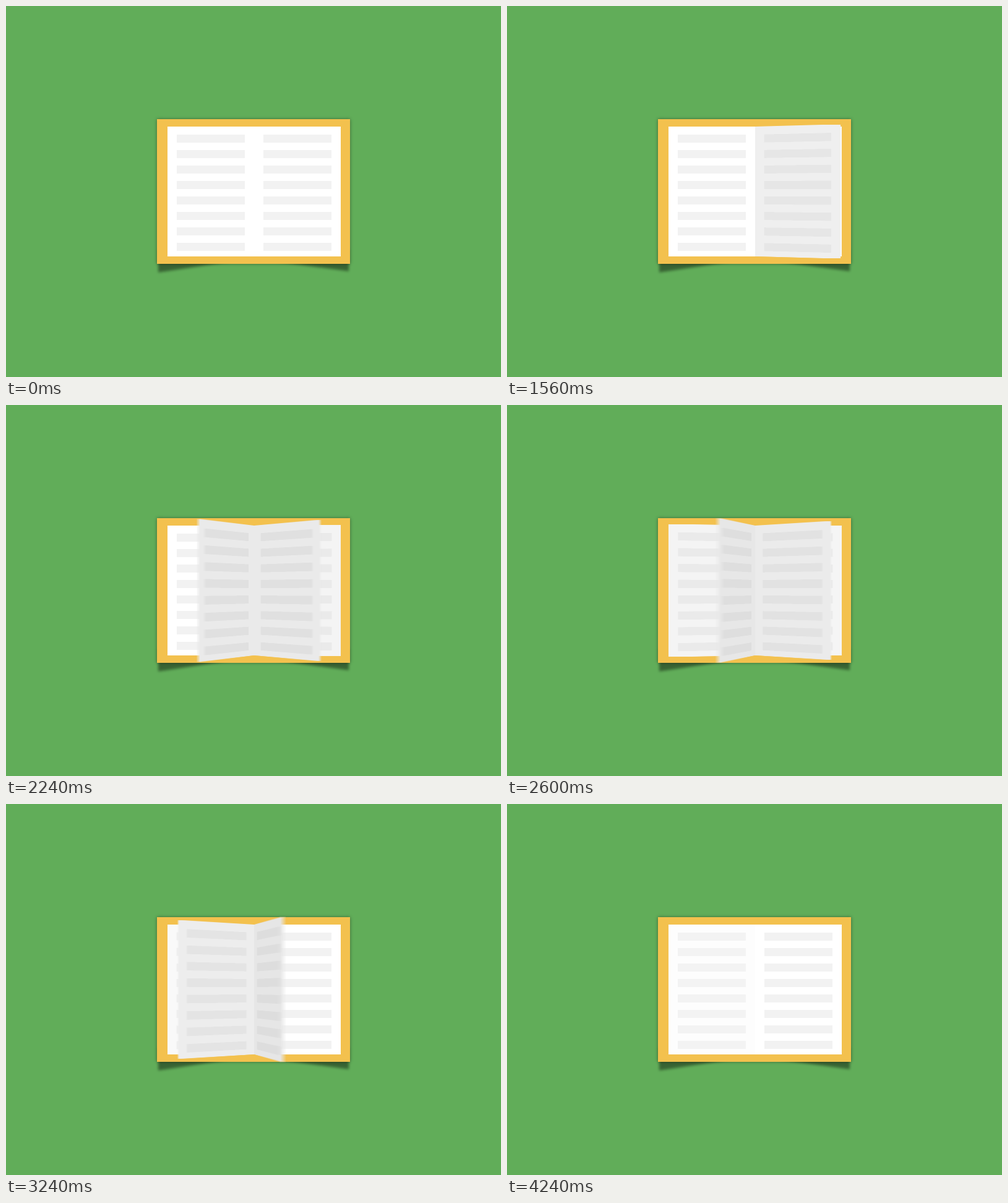
An HTML page without scripts for the animation above (5 s loop, 800 px wide and 600 px high).

```html
<!DOCTYPE html>
<html lang="en">
<head>
<meta charset="utf-8">
<title>Turning pages</title>
<style>
html, body { margin: 0; width: 100%; height: 100%; overflow: hidden; background: #61ad59; }
.stage { position: relative; width: 800px; height: 600px; overflow: hidden; }
.stage > * { position: absolute; }
.curl { left: 0; top: 0; }
.cover {
  left: 244px; top: 183px; width: 312px; height: 234px;
  background: #f3c14e; box-shadow: 0 0 5px rgba(0, 0, 0, .42);
}
.page, .leaf { left: 401px; top: 195px; width: 140px; height: 210px; }
.left { left: 261px; }
.page, .leaf i {
  box-sizing: border-box; padding: 13px 15px 0;
  background:
    linear-gradient(#f2f2f2 13px, transparent 0) 0 0 / 110px 25px repeat-y content-box,
    #fff;
}

/* Each leaf is the sum of five faint sheets a few ms apart: motion blur */
.leaf {
  isolation: isolate;
  animation: stack 5s var(--d) step-end infinite backwards, shade 5s var(--d) linear infinite backwards;
}
.leaf i {
  --o: 0ms;
  position: absolute; inset: 0; opacity: .2; mix-blend-mode: plus-lighter;
  transform-origin: 0 50%;
  animation: turn 5s calc(var(--d) + var(--o)) linear infinite backwards;
}
.leaf i:nth-child(1) { --o: -8ms; }
.leaf i:nth-child(2) { --o: -4ms; }
.leaf i:nth-child(4) { --o: 4ms; }
.leaf i:nth-child(5) { --o: 8ms; }

@keyframes turn {
  0% { transform: perspective(1200px) rotateY(0deg); }
  21% { transform: perspective(1200px) rotateY(0deg); animation-timing-function: cubic-bezier(.55, 0, .45, 1); }
  61%, 100% { transform: perspective(1200px) rotateY(-180deg); }
}
@keyframes shade {
  0%, 22.39% { filter: brightness(1); }
  22.4% { filter: brightness(.98); }
  40.8% { filter: brightness(.894); }
  58.8%, 100% { filter: brightness(.992); }
}
/* Shown only in flight; the stacking order flips at the spine */
@keyframes stack {
  0% { visibility: hidden; z-index: calc(9 - var(--i)); }
  22.4% { visibility: visible; z-index: calc(9 - var(--i)); }
  41% { visibility: visible; z-index: calc(9 + var(--i)); }
  74.4%, 100% { visibility: hidden; z-index: calc(9 + var(--i)); }
}
</style>
</head>
<body>
<div class="stage">
  <svg class="curl" width="800" height="600">
    <defs>
      <filter id="soft" x="-10%" y="-30%" width="120%" height="160%"><feGaussianBlur stdDeviation="2"/></filter>
    </defs>
    <g filter="url(#soft)" fill="#000" fill-opacity=".42">
      <path d="M246 394V431L365 413V394Z"/>
      <path d="M554 394V429L435 413V394Z"/>
    </g>
  </svg>
  <div class="cover"></div>
  <div class="page left"></div>
  <div class="page"></div>
  <div class="leaf" style="--i:0;--d:0ms"><i></i><i></i><i></i><i></i><i></i></div>
  <div class="leaf" style="--i:1;--d:435ms"><i></i><i></i><i></i><i></i><i></i></div>
  <div class="leaf" style="--i:2;--d:870ms"><i></i><i></i><i></i><i></i><i></i></div>
  <div class="leaf" style="--i:3;--d:1280ms"><i></i><i></i><i></i><i></i><i></i></div>
</div>
</body>
</html>
```
